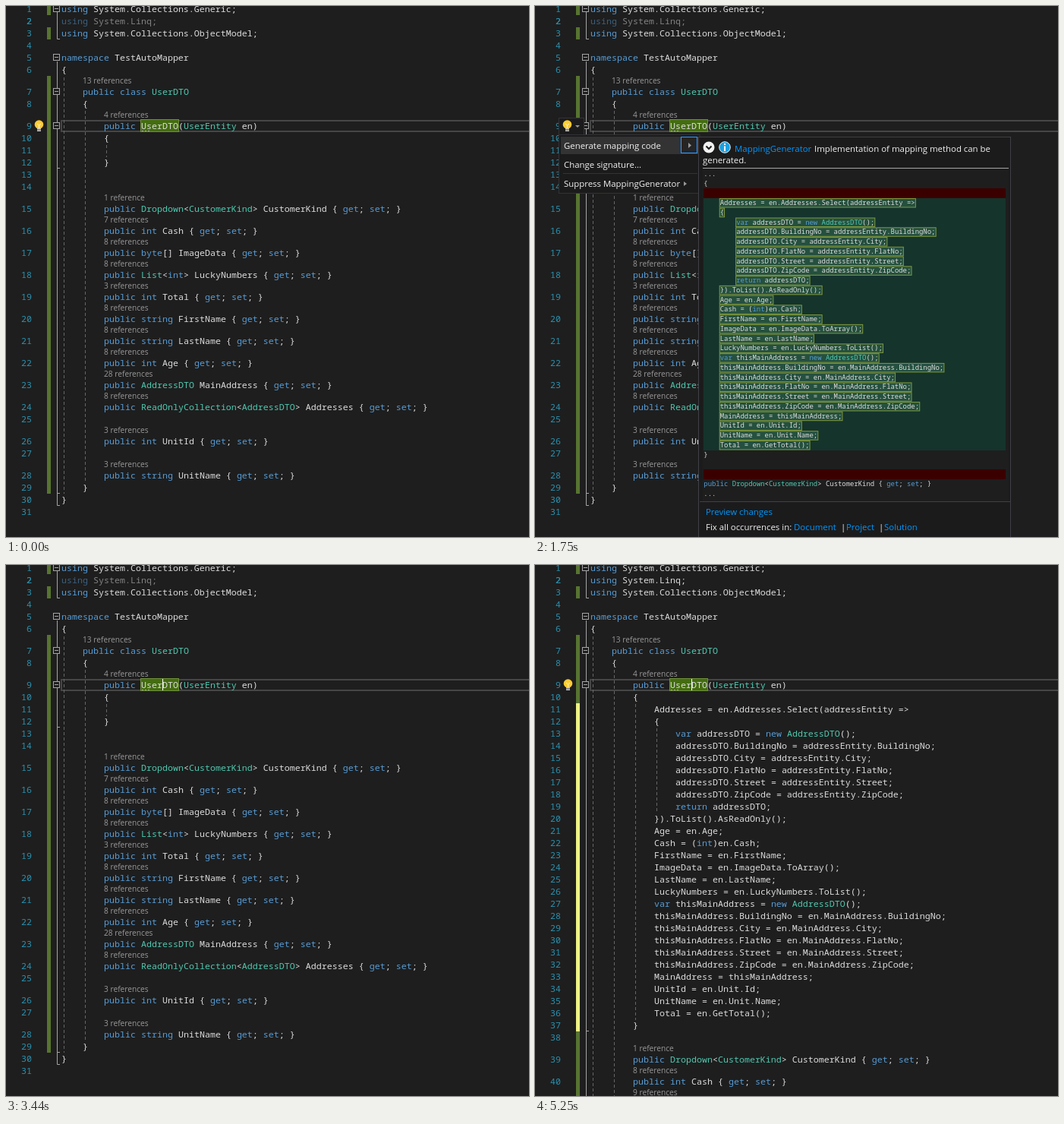
Write an HTML page that moves like this. It is 689 px wide and 699 px high and loops after 5310 ms.

```html
<!DOCTYPE html>
<html lang="en">
<head>
<meta charset="utf-8">
<title>Generate mapping code</title>
<style>
  html, body { margin: 0; width: 100%; height: 100%; overflow: hidden; background: #1e1e1e; }
  svg { display: block; }
  text { white-space: pre; fill: #dcdcdc; }
  .code { font: 11.667px "Noto Sans Mono", monospace; }
  .small { font: 8.93px "Noto Sans Mono", monospace; }
  .ui { font: 11.42px "Open Sans", sans-serif; fill: #f1f1f1; }
  .lens { font: 10.2px "Open Sans", sans-serif; fill: #999; }
  .num { fill: #2b91af; text-anchor: end; }
  .key { fill: #569cd6; }
  .type { fill: #4ec9b0; }
  .raw .type, .raw .var { fill: #dcdcdc; }
  .link { fill: #0097fb; }
  .dim { opacity: .52; }
</style>
</head>
<body>
<svg id="stage" width="689" height="699" viewBox="0 0 689 699"></svg>
<script>
const LOOP = 5310;
const stage = document.getElementById('stage');
const tracks = [];

function node(parent, tag, attrs = {}, text = '') {
  const el = document.createElementNS('http://www.w3.org/2000/svg', tag);
  for (const name in attrs) el.setAttribute(name, attrs[name]);
  el.textContent = text;
  parent.append(el);
  return el;
}
const rect = (g, x, y, width, height, fill, stroke = 'none') =>
  node(g, 'rect', { x, y, width, height, fill, stroke });
const path = (g, d, stroke, extra = {}) => node(g, 'path', { d, stroke, fill: 'none', ...extra });
const label = (g, x, y, text, cls = 'ui') => node(g, 'text', { x, y, class: cls }, text);

// A group that is visible during each [from, to) span of the loop.
function during(...spans) {
  const el = node(stage, 'g');
  tracks.push({ el, spans });
  return el;
}

// Types are marked with @; leading spaces become an offset.
function code(g, x, y, source, advance = 7, cls = 'code') {
  const body = source.trimStart();
  const left = x + (source.length - body.length) * advance;
  const text = label(g, left, y, '', cls);
  const tokens = /(@\w+|\b(?:using|namespace|public|class|int|byte|string|get|set|new|return|var)\b)/;
  for (const part of body.split(tokens)) {
    const kind = part[0] === '@' ? 'type' : part === 'var' ? 'key var' : tokens.test(part) ? 'key' : '';
    if (part) node(text, 'tspan', kind ? { class: kind } : {}, part.replace('@', ''));
  }
  return { left, width: body.replace(/@/g, '').length * advance };
}

// Rows are "code" or "lens|code"; a lens makes the row 13px taller.
function rows(g, number, y, list) {
  for (const row of list) {
    const [source, lens] = row.split('|').reverse();
    if (lens !== undefined) {
      y += 13;
      label(g, 73 + source.search(/\S/) * 7, y - 11, lens, 'lens');
    }
    label(g, 34, y + 4, number++, 'code num');
    if (source.trim()) code(g, 73, y + 4, source);
    y += 16;
  }
}

const guide = (g, x, y1, y2) =>
  path(g, `M${x + .5} ${y1}V${y2}`, '#666', { 'stroke-dasharray': '4 3' });
const bar = (g, y1, y2, color = '#577430') => rect(g, 54, y1, 5, y2 - y1, color);
const outline = (g, d) => path(g, d, '#a5a5a5');

function foldBox(g, y) {
  rect(g, 62.5, y - 4.5, 8, 8, '#1e1e1e', '#a5a5a5');
  outline(g, `M64 ${y - .5}H69`);
}

function bulb(g, x) {
  node(g, 'circle', { cx: x, cy: 156, r: 5.8, fill: '#ffcc33' });
  path(g, `M${x - 2.5} 155L${x} 157L${x + 2.5} 155M${x} 157V161`, '#fff3c4');
  rect(g, x - 2.5, 161, 5, 4, '#c8c8c8');
  path(g, `M${x - 2.5} 163H${x + 2.5}`, '#555');
}

const statements = [
  'Addresses = en.Addresses.Select(addressEntity =>',
  '{',
  '    var addressDTO = new @AddressDTO();',
  ...['BuildingNo', 'City', 'FlatNo', 'Street', 'ZipCode']
    .map(field => `    addressDTO.${field} = addressEntity.${field};`),
  '    return addressDTO;',
  '}).ToList().AsReadOnly();',
  'Age = en.Age;',
  'Cash = (int)en.Cash;',
  'FirstName = en.FirstName;',
  'ImageData = en.ImageData.ToArray();',
  'LastName = en.LastName;',
  'LuckyNumbers = en.LuckyNumbers.ToList();',
  'var thisMainAddress = new @AddressDTO();',
  ...['BuildingNo', 'City', 'FlatNo', 'Street', 'ZipCode']
    .map(field => `thisMainAddress.${field} = en.MainAddress.${field};`),
  'MainAddress = thisMainAddress;',
  'UnitId = en.Unit.Id;',
  'UnitName = en.Unit.Name;',
  'Total = en.GetTotal();'
];
const property = (lens, name) => `${lens}|        public ${name} { get; set; }`;
const dropdown = '@Dropdown<@CustomerKind> CustomerKind';

// Parts that never change
const base = node(stage, 'g');
rect(base, 0, 0, 689, 699, '#1e1e1e');
path(base, 'M689 151H73V165H689', '#464646', { 'stroke-width': 2 });
bar(base, 0, 12);
bar(base, 28, 44);
bar(base, 92, 182);
outline(base, 'M67.5 8V43.5H71M67.5 73V640');

const mark = during([0, 3750], [5250, LOOP]);
rect(mark, 177.5, 149.5, 50, 16, '#446d10', '#6f8f3c');

const text = node(stage, 'g');
rows(text, 1, 4, ['using System.Collections.Generic;', '', 'using System.Collections.ObjectModel;', '',
  'namespace TestAutoMapper', '{', '13 references|    public class @UserDTO', '    {',
  '4 references|        public UserDTO(@UserEntity en)', '        {']);
label(text, 34, 24, 2, 'code num');
[4, 68, 113, 158].forEach(y => foldBox(text, y));
path(text, 'M179 164.5H190', '#a5a5a5', { 'stroke-dasharray': '2 2' });

const unused = during([0, 4810]);
node(unused, 'g', { class: 'dim' });
code(unused.firstChild, 73, 24, 'using System.Linq;');
code(during([4810, LOOP]), 73, 24, 'using System.Linq;');

// Empty constructor
const before = during([0, 3750]);
bar(before, 182, 642);
outline(before, 'M67.5 213.5H71M67.5 640V657.5H71M67.5 641.5H71');
guide(before, 76, 94, 642);
guide(before, 104, 138, 626);
guide(before, 132, 183, 199);
rows(before, 11, 190, ['', '        }', '', '',
  property('1 reference', dropdown),
  property('7 references', 'int Cash'),
  property('8 references', 'byte[] ImageData'),
  property('8 references', '@List<int> LuckyNumbers'),
  property('3 references', 'int Total'),
  property('8 references', 'string FirstName'),
  property('8 references', 'string LastName'),
  property('8 references', 'int Age'),
  property('28 references', '@AddressDTO MainAddress'),
  property('8 references', '@ReadOnlyCollection<@AddressDTO> Addresses'), '',
  property('3 references', 'int UnitId'), '',
  property('3 references', 'string UnitName'), '    }', '}', '']);

// Filled constructor
const after = during([3750, LOOP]);
bar(after, 182, 614, '#eff284');
bar(after, 614, 699);
outline(after, 'M67.5 613.5H71M67.5 640V699');
guide(after, 76, 94, 699);
guide(after, 104, 138, 699);
guide(after, 132, 183, 599);
guide(after, 160, 215, 327);
const semantic = line => line.includes('var ');
rows(after, 11, 190, [...statements.map(line => semantic(line) ? '' : ' '.repeat(12) + line),
  '        }', '', property('1 reference', dropdown), property('', 'int Cash')]);

const raw = during([3750, 3910]);
raw.setAttribute('class', 'raw');
for (const g of [raw, during([3910, LOOP])]) {
  statements.forEach((line, i) => semantic(line) && code(g, 157, 194 + i * 16, line));
}
[[during([3750, 5250]), 7], [during([5250, LOOP]), 8]].forEach(([g, count]) => {
  label(g, 129, 669, `${count} references`, 'lens');
  label(g, 129, 698, `${count + 1} references`, 'lens');
});

const caret = during([140, 680], [3440, 3970], [4120, 4510], [4870, 5030], [5250, LOOP]);
rect(caret, 206, 150, 1, 15, '#fff');

bulb(during([0, 910], [4650, LOOP]), 43.5);

// Light bulb menu
const button = during([910, 3380]);
rect(button, 31.5, 147.5, 33, 22, '#1b1b1c', '#333337');
bulb(button, 42.5);
node(button, 'path', { d: 'M53 157H59L56 160Z', fill: '#999' });

const menu = during([990, 3380]);
rect(menu, 31.5, 169.5, 185.5, 77, '#1b1b1c', '#333337');
rect(menu, 34, 172, 181, 23, '#333334');
path(menu, 'M37 220.5H214', '#333337');
label(menu, 38, 188, 'Generate mapping code');
label(menu, 38, 213, 'Change signature...');
label(menu, 38, 238, 'Suppress MappingGenerator');
node(menu, 'path', { d: 'M196 231V237L200 234Z', fill: '#999' });

// Preview pane
const preview = during([1750, 3380]);
rect(preview, 192.5, 172.5, 21, 21, '#252526', '#3399ff');
node(preview, 'path', { d: 'M202 180V187L206 183.5Z', fill: '#999' });
rect(preview, 215.5, 172.5, 411, 530, '#1b1b1c', '#3f3f46');
rect(preview, 221, 214, 403, 438, '#1e1e1e');
path(preview, 'M221 213.5H624', '#a5a5a5');
path(preview, 'M217 652.5H626', '#3f3f46');

node(preview, 'circle', { cx: 229, cy: 186, r: 7.5, fill: '#f1f1f1' });
path(preview, 'M225.5 184.5L229 188L232.5 184.5', '#1b1b1c', { 'stroke-width': 2 });
node(preview, 'circle', { cx: 250, cy: 186, r: 7.3, fill: '#1ba1e2', stroke: '#f1f1f1' });
path(preview, 'M250 181V183M250 184.5V191', '#fff', { 'stroke-width': 2 });
label(preview, 263, 192, 'MappingGenerator', 'ui link');
label(preview, 368, 192, 'Implementation of mapping method can be');
label(preview, 221, 207, 'generated.');

const STEP = 12.76, ADVANCE = 5.358;
const small = (y, source, x = 222.3) => code(preview, x, y + 3, source, ADVANCE, 'small');
rect(preview, 222, 240, 398, 13, '#3a0000');
rect(preview, 222, 253, 398, 332, '#15342c');
rect(preview, 222, 610, 398, 13, '#3a0000');
small(221, '...');
small(234, '{');
statements.forEach((line, i) => {
  const y = 259 + i * STEP;
  const box = rect(preview, 0, y - 5.5, 0, 11.5, '#25503f', '#7f9a3c');
  const { left, width } = small(y, line, 243.7);
  box.setAttribute('x', left - .5);
  box.setAttribute('width', width + 1);
});
small(591, '}');
small(629, `public ${dropdown} { get; set; }`);
small(642, '...');

label(preview, 225, 670, 'Preview changes', 'ui link');
label(preview, 225, 690, 'Fix all occurrences in:');
label(preview, 341, 690, 'Document', 'ui link');
label(preview, 403, 690, '|');
label(preview, 410, 690, 'Project', 'ui link');
label(preview, 453, 690, '|');
label(preview, 460, 690, 'Solution', 'ui link');

path(during([2290, 3380]), 'M358 289.5H367M362 468.5H371', '#b4b4b4', { 'stroke-dasharray': '2 1.5' });

function frame() {
  const time = performance.now() % LOOP;
  for (const { el, spans } of tracks) {
    const visible = spans.some(([from, to]) => time >= from && time < to);
    el.style.display = visible ? '' : 'none';
  }
  requestAnimationFrame(frame);
}
frame();
</script>
</body>
</html>
```
